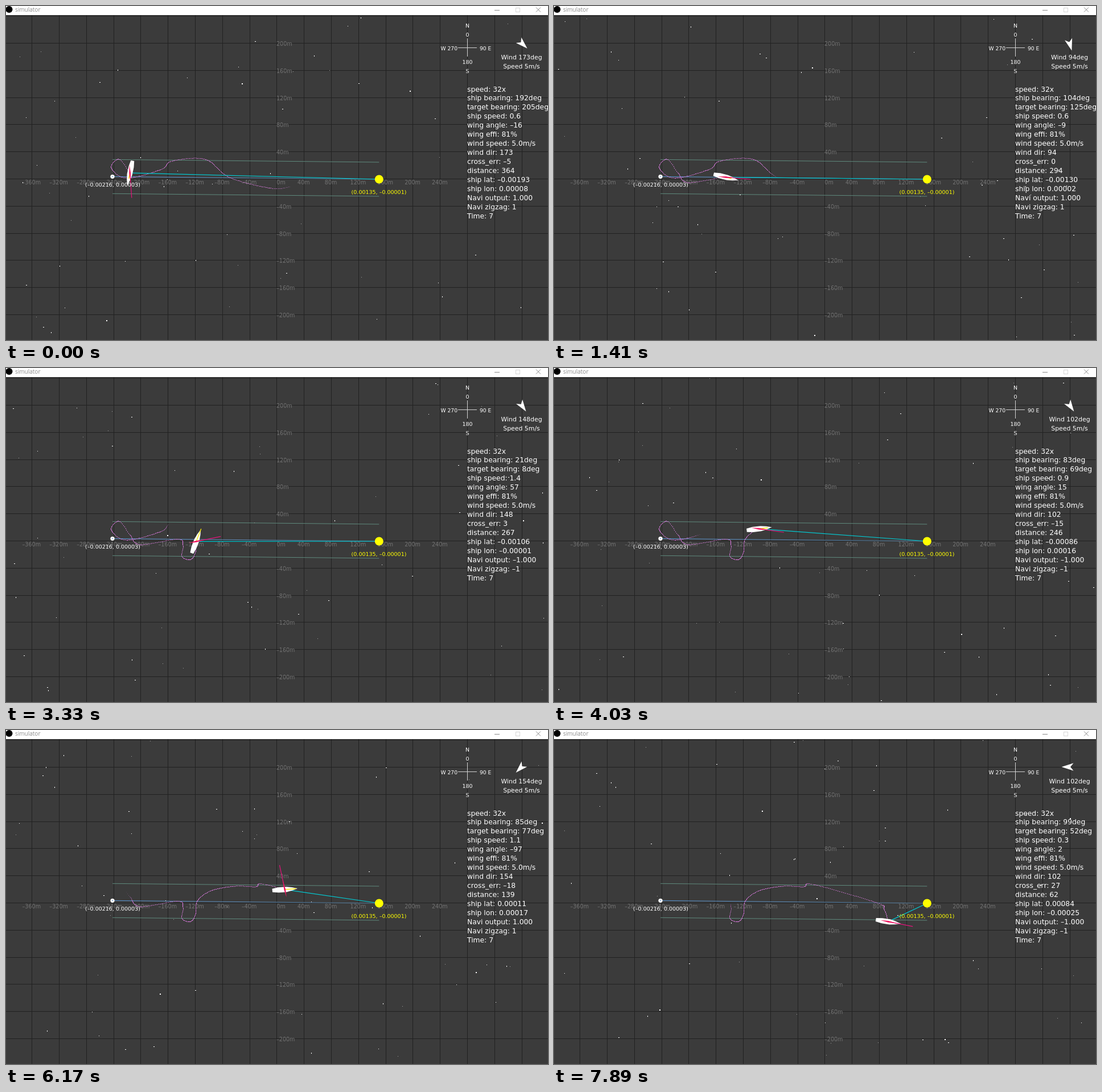
These frames come from a looping animation (952x588 px, 7.99 s). An HTML page with a canvas:

```html
<!DOCTYPE html>
<html lang="en">
<head>
<meta charset="utf-8">
<title>simulator</title>
<style>
  html, body { margin: 0; width: 100%; height: 100%; overflow: hidden; background: #3b3b3b; }
  canvas { display: block; width: 952px; height: 588px; }
</style>
</head>
<body>
<canvas id="stage" width="952" height="588"></canvas>
<script>
const W = 952, H = 588, LOOP = 7990, LAST = 78, TRAIL = 62;
const ORIGIN = { x: 475, y: 304 }, GRID = 47.8;
const START = { x: 187, y: 300.3 }, GOAL = { x: 655.3, y: 305 };
const DEGREE = 133333, METER = 1.2;
const ctx = document.getElementById('stage').getContext('2d');

// Turning points of the course: step, x, y
const COURSE = [
  [-62, 500, 318], [-58, 466, 321], [-48, 393, 302], [-38, 350, 270],
  [-30, 292, 273], [-25, 272, 288], [-14, 212, 303], [-8, 185, 285],
  [-3, 199, 270], [0, 217.7, 293.8], [6, 236, 311], [14, 301.7, 301.4],
  [18, 311, 313], [21, 309, 332], [25, 324.3, 337.3], [29, 333, 324],
  [34, 336, 301], [40, 360.3, 283.1], [48, 402, 275], [53, 438.6, 276],
  [57, 456, 272], [69, 567, 304.2], [73, 580, 316], [78, 587, 337.4]
];

// Instrument readings: step, bearing, target bearing, speed, wing, wind, wind arrow
const READINGS = [
  [0, 192, 205, .6, -16, 173, 134],
  [14, 104, 125, .6, -9, 94, 164],
  [25, 71, 60, 2, 106, 201, 145],
  [40, 83, 69, .9, 15, 102, 146],
  [53, 63, 43, .7, -169, 251, 180],
  [69, 91, 95, 1.6, -26, 57, 270],
  [78, 99, 52, .3, 2, 102, 270]
];
const TACKS = [22, 56, 75];

const mix = (a, b, u) => a + (b - a) * u;

function locate(rows, step) {
  let k = 0;
  while (k < rows.length - 2 && rows[k + 1][0] <= step) k++;
  return { k, u: (step - rows[k][0]) / (rows[k + 1][0] - rows[k][0]) };
}

// Catmull-Rom curve through the course
function shipAt(step) {
  const { k, u } = locate(COURSE, step);
  const curve = axis => {
    const [a, b, c, d] = [-1, 0, 1, 2].map(n =>
      COURSE[Math.max(0, Math.min(COURSE.length - 1, k + n))][axis]);
    return b + .5 * u * (c - a + u * (2 * a - 5 * b + 4 * c - d + u * (3 * (b - c) + d - a)));
  };
  return { x: curve(1), y: curve(2) };
}

function headingAt(step) {
  const p = shipAt(step - .4), q = shipAt(step + .4);
  return Math.atan2(q.x - p.x, p.y - q.y) * 180 / Math.PI;
}

const wrap = deg => ((deg + 180) % 360 + 360) % 360 - 180;

// The hull follows the course, turned by a slowly changing drift angle
function stateAt(step) {
  const { k, u } = locate(READINGS, step);
  const from = READINGS[k], to = READINGS[k + 1];
  const drift = row => wrap(row[1] - headingAt(row[0]));
  const [, , , speed, wing, wind, arrow] = from.map((v, n) => mix(v, to[n], u));
  const bearing = (headingAt(step) + mix(drift(from), drift(to), u) + 360) % 360;
  const aim = bearing + mix(from[2] - from[1], to[2] - to[1], u);
  return { step, pos: shipAt(step), bearing, aim, speed, wing, wind: Math.round(wind), arrow };
}

function random(seed) {
  let a = seed * 7919 + 17;
  return () => {
    a = (a + 0x6D2B79F5) | 0;
    let n = Math.imul(a ^ (a >>> 15), 1 | a);
    n = (n + Math.imul(n ^ (n >>> 7), 61 | n)) ^ n;
    return ((n ^ (n >>> 14)) >>> 0) / 4294967296;
  };
}

function line(x1, y1, x2, y2, color, width = 1) {
  ctx.strokeStyle = color;
  ctx.lineWidth = width;
  ctx.beginPath();
  ctx.moveTo(x1, y1);
  ctx.lineTo(x2, y2);
  ctx.stroke();
}

function shape(points, color) {
  ctx.fillStyle = color;
  ctx.beginPath();
  points.forEach(([x, y]) => ctx.lineTo(x, y));
  ctx.fill();
}

function dot(x, y, r, color) {
  ctx.fillStyle = color;
  ctx.beginPath();
  ctx.arc(x, y, r, 0, Math.PI * 2);
  ctx.fill();
}

function text(str, x, y, size, color, align = 'left', family = '"DejaVu Sans", sans-serif') {
  ctx.font = `${size}px ${family}`;
  ctx.textAlign = align;
  ctx.fillStyle = color;
  ctx.fillText(str.replace(/-/g, '\u2013'), x, y);
}

// Local frame whose x axis points along a compass bearing
function facing(x, y, bearing, draw) {
  ctx.save();
  ctx.translate(x, y);
  ctx.rotate((bearing - 90) * Math.PI / 180);
  draw();
  ctx.restore();
}

function drawGrid() {
  for (let k = -9; k <= 9; k++) {
    const x = Math.round(ORIGIN.x + .45 + k * GRID) + .5;
    const y = Math.round(ORIGIN.y + k * GRID) + .5;
    line(x, 16, x, H, '#212121');
    line(0, y, W, y, '#212121');
  }
  for (let k = -9; k <= 6; k++)
    text(k * 40 + 'm', ORIGIN.x + k * GRID + (k ? 0 : 8), 314, 9.6, '#737373', 'center');
  for (let k = -5; k <= 5; k++)
    if (k) text(k * 40 + 'm', ORIGIN.x, 309 - k * GRID, 9.6, '#737373');
}

function drawRoute() {
  for (const side of [-30, 30])
    line(START.x, START.y + side, GOAL.x, GOAL.y + side, '#5f8a7d');
  const blue = ctx.createLinearGradient(START.x, 0, GOAL.x, 0);
  blue.addColorStop(0, '#5b97d4');
  blue.addColorStop(1, '#5a7f9c');
  line(START.x, START.y, GOAL.x, GOAL.y, blue);
}

function drawTrail(step) {
  const first = step - TRAIL, gap = .3;
  for (let n = Math.ceil(first / gap); n * gap < step; n++) {
    const s = n * gap, p = shipAt(s), q = shipAt(Math.min(step, s + gap));
    const fade = Math.min(1, (s - first + .3) / 4);
    ctx.globalAlpha = fade * .25;
    line(p.x, p.y, q.x, q.y, '#c97fcf');
    ctx.globalAlpha = fade;
    ctx.fillStyle = '#e27be6';
    ctx.fillRect(Math.round(p.x - .5), Math.round(p.y - .5), 1, 1);
  }
  ctx.globalAlpha = 1;
}

function drawShip({ pos, bearing, speed, wing }) {
  line(pos.x, pos.y, GOAL.x, GOAL.y, '#00cdd6', 1.2);
  dot(GOAL.x, GOAL.y, 7.5, '#ffff00');
  facing(pos.x, pos.y, bearing, () => {
    shape([[-22, -3], [-11, -4.6], [3, -4.6], [13, -2.8], [22.5, 0],
           [13, 2.8], [3, 4.6], [-11, 4.6], [-22, 3]], '#ffffff');
    line(0, 0, 17 * speed, 0, '#f5e400', 1.3);
  });
  facing(pos.x, pos.y, bearing + wing, () => {
    line(0, 0, 44, 0, '#e6127c', 1.2);
    shape([[-14, 0], [0, -1.4], [18, 0], [0, 1.4]], '#f0145f');
  });
}

function drawMarkers() {
  dot(START.x, START.y, 3.6, '#ffffff');
  dot(START.x, START.y, 1.1, '#86a9dc');
  text('(-0.00216, 0.00003)', 187.5, 317.5, 9.5, '#ffffff', 'center');
  text('(0.00135, -0.00001)', 655, 330.5, 9.5, '#ffff00', 'center');
}

function drawCompass({ wind, arrow }) {
  line(794, 73.5, 827, 73.5, '#d0d0d0');
  line(810.5, 57, 810.5, 89, '#d0d0d0');
  ['N', '0', '', '', '180', 'S'].forEach((label, n) =>
    text(label, 810.5, 37.5 + n * 16, 9.4, '#ffffff', 'center'));
  text('W 270', 793, 77.5, 9.2, '#ffffff', 'right');
  text('90 E', 832, 77.5, 9.2, '#ffffff');
  facing(905.5, 65, arrow, () =>
    shape([[14, 0], [-7, -6.8], [-1.5, 0], [-7, 6.8]], '#ffffff'));
  text(`Wind ${wind}deg`, 905.5, 94, 10.9, '#ffffff', 'center');
  text('Speed 5m/s', 905.5, 110, 10.9, '#ffffff', 'center');
}

function drawPanel({ step, pos, bearing, aim, speed, wing, wind }) {
  const slope = (GOAL.y - START.y) / (GOAL.x - START.x);
  const error = Math.trunc((pos.y - START.y - (pos.x - START.x) * slope) / METER);
  const distance = Math.hypot(GOAL.x - pos.x, GOAL.y - pos.y) / METER;
  const zigzag = TACKS.filter(t => t <= step).length % 2 ? -1 : 1;
  [
    'speed: 32x',
    `ship bearing: ${Math.round(bearing)}deg`,
    `target bearing: ${Math.round(aim)}deg`,
    `ship speed: ${speed.toFixed(1)}`,
    `wing angle: ${Math.round(wing)}`,
    'wing effi: 81%',
    'wind speed: 5.0m/s',
    `wind dir: ${wind}`,
    `cross_err: ${error}`,
    `distance: ${Math.floor(distance)}`,
    `ship lat: ${((pos.x - ORIGIN.x) / DEGREE).toFixed(5)}`,
    `ship lon: ${((ORIGIN.y - pos.y) / DEGREE).toFixed(5)}`,
    `Navi output: ${zigzag.toFixed(3)}`,
    `Navi zigzag: ${zigzag}`,
    'Time: 7'
  ].forEach((row, n) => text(row, 810, 150.5 + n * 15.95, 12.3, '#ffffff'));
}

function drawSpecks(step) {
  const rnd = random(step + 1);
  for (let n = 0; n < 58; n++) {
    const x = Math.floor(rnd() * W), y = 18 + Math.floor(rnd() * (H - 19));
    const size = rnd();
    ctx.fillStyle = size < .25 ? '#a0a0a0' : '#ffffff';
    ctx.fillRect(x, y, size > .7 ? 2 : 1, size > .5 && size < .75 ? 2 : 1);
  }
}

function drawTitle() {
  ctx.fillStyle = '#ffffff';
  ctx.fillRect(0, 0, W, 16);
  dot(5.5, 6, 6, '#000000');
  text('simulator', 16, 10, 10, '#8c8c8c', 'left', '"Open Sans", sans-serif');
  line(858, 7.5, 867, 7.5, '#8a8a8a');
  ctx.strokeStyle = '#d6d6d6';
  ctx.strokeRect(895.5, 3.5, 7, 7);
  line(931, 2.5, 939, 10.5, '#8a8a8a');
  line(939, 2.5, 931, 10.5, '#8a8a8a');
}

function frame(time) {
  const step = Math.min(LAST, Math.floor((time % LOOP + 20) / 101.2));
  const state = stateAt(step);
  ctx.fillStyle = '#3b3b3b';
  ctx.fillRect(0, 0, W, H);
  drawGrid();
  drawRoute();
  drawTrail(step);
  drawShip(state);
  drawMarkers();
  drawCompass(state);
  drawPanel(state);
  drawSpecks(step);
  drawTitle();
}

const begin = performance.now();
function tick() {
  frame(performance.now() - begin);
  requestAnimationFrame(tick);
}
tick();
</script>
</body>
</html>
```
